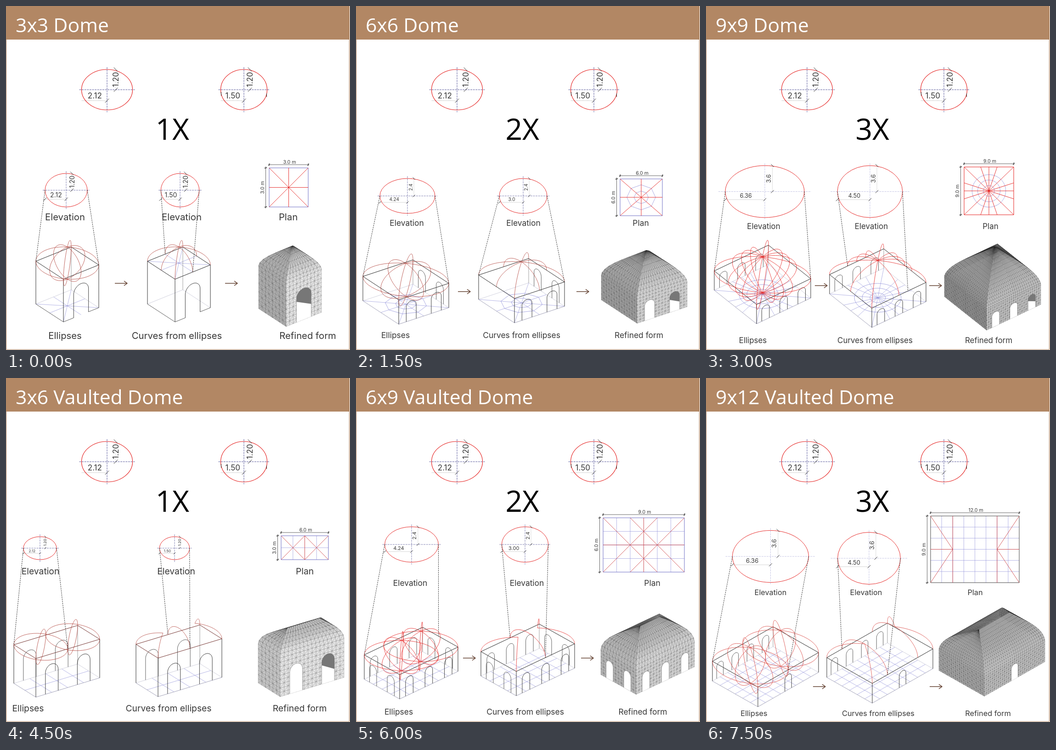
Write an HTML page with a canvas that moves like this. It is 749 px wide and 748 px high and loops after 9 s.

```html
<!DOCTYPE html>
<html lang="en">
<head>
<meta charset="utf-8">
<title>Dome types</title>
<style>
html, body { margin: 0; width: 100%; height: 100%; overflow: hidden; background: #fff; }
canvas { display: block; width: 749px; height: 748px; }
</style>
</head>
<body>
<canvas id="stage"></canvas>
<script>
const W = 749, H = 748, HOLD = 1500, TAU = Math.PI * 2;
const BROWN = '#b28764', RED = '#e5201f', DULL = '#b03f38', BLUE = '#8585d6', INK = '#1c1c1c';
const canvas = document.getElementById('stage');
const dpr = window.devicePixelRatio || 1;
canvas.width = W * dpr;
canvas.height = H * dpr;
const g = canvas.getContext('2d');

// Plan directions run from -1 to 1 on both axes.
const DIAGONALS = [[1, 1], [1, -1]];
const STAR = [...DIAGONALS, [1, 0], [0, 1]];
const THIRDS = [[1, 1/3], [1/3, 1], [-1/3, 1], [1, -1/3]];
const CORNERS = [[1, 1], [1, -1], [-1, 1], [-1, -1]];
const WIDE = [[-1, 1], [1, -1]], MID = [[0, 1], [0, -1]];

// k: scale factor; left, right: base edges from the front corner; fronts: front corner of each building;
// doors: count and width per wall; feet: roof points where the guide lines of each building land.
const scenes = [
  {
    k: 1, arc: DULL, left: [-60, -39], right: [77, -31], h: 93, z: 35, rise: 47, solid: true,
    fronts: [[125, 687], [368, 687], [610, 697]], doors: { FR: [1, 0.42] }, door: 68, dark: true, feet: [WIDE, MID],
    ellipse: [131, 400.5, 46, 36.5], second: [379, 400.5], font: 14, plan: [615.5, 394.5, 85, 85],
    ink: 20.3, rows: [466, 724], xs: [128.5, 382.5, 614.5, 128.5, 372, 657], arrows: [237, 477, 603]
  },
  {
    k: 2, arc: DULL, left: [-78, -51], right: [109, -36], h: 53, z: 36, rise: 62,
    fronts: [[93, 692], [345, 689], [612, 690]], doors: { FR: [2, 0.2], BR: [2, 0.2] }, door: 42, dark: true, feet: [WIDE, WIDE],
    ellipse: [112, 413, 60, 38], second: [364, 413], font: 10, short: '3.0', plan: [621, 416, 92, 80],
    ink: 17.4, rows: [478, 722], xs: [110.5, 364.5, 620, 86, 360.5, 616], arrows: [222, 480, 621]
  },
  {
    k: 3, arc: RED, left: [-92, -73], right: [118, -56], h: 42, z: 39, rise: 75,
    fronts: [[110, 691], [361, 699], [611, 705]], doors: { FR: [3, 0.14], LB: [3, 0.14] }, door: 31, dark: true,
    feet: [WIDE, [[-1/3, 1], [1/3, -1]]],
    ellipse: [128, 403.5, 86, 56.5], second: [357, 403.5], font: 12.5, plan: [616, 402, 108, 104],
    ink: 16.9, rows: [485, 733], xs: [125.5, 360, 619.5, 102, 368, 615.5], arrows: [237, 486, 608]
  },
  {
    k: 1, vault: true, ridge: 1/2, arc: DULL, edge: '#6d2a26', left: [-48, -30], right: [139, -42], h: 84, z: 29, rise: 40,
    fronts: [[65, 694], [331, 693], [597, 693]], doors: { FR: [2, 0.2], LB: [2, 0.2] }, door: 62, dark: true,
    feet: [[[-1, 1], [0, -1]], MID],
    ellipse: [74, 370, 36, 25], second: [367, 370], font: 8, plan: [650.5, 369, 103, 52],
    ink: 19.3, rows: [427, 725], xs: [75, 370.5, 650.5, 48, 354, 639.5]
  },
  {
    k: 2, vault: true, ridge: 1/3, arc: RED, left: [-77, -43], right: [127, -60], h: 53, z: 33, rise: 54,
    fronts: [[95, 698], [349, 691], [610, 688]], doors: { FR: [3, 0.13], FL: [2, 0.2], LB: [3, 0.13], BR: [2, 0.2] }, door: 40,
    feet: [[[-1, 1], [1, 0.1]], MID],
    ellipse: [121, 362, 58.5, 38.5], second: [368, 362], font: 11, plan: [626.5, 363, 177, 118],
    ink: 17.4, rows: [452, 732], xs: [118, 372, 645, 93, 368.5, 624.5], arrows: [233, 490, 609]
  },
  {
    k: 3, vault: true, ridge: 1/2, arc: '#d8413c', left: [-99, -56], right: [132, -75], h: 43, z: 39, rise: 55,
    fronts: [[113, 715], [362, 707], [606, 692]], doors: { FR: [1, 0.11], LB: [4, 0.11] }, door: 33,
    feet: [[[-1, 1], [0, -1]], [[-1/2, 1], [-1/2, -1]]],
    ellipse: [140.5, 388, 83, 56.5], second: [355, 392], font: 13, plan: [585.5, 372.5, 193, 145],
    ink: 16.3, rows: [472, 735], xs: [140.5, 348.5, 586, 104.5, 375, 614], arrows: [233, 487, 671]
  }
];

// Fills in the lines and arcs that follow from the type and the scale.
function layOut(s) {
  const { k, ridge: c = 0 } = s, half = 1 - c;
  s.ridge = c;
  s.depth = 3 * k;
  s.length = s.vault ? s.depth + 3 : s.depth;
  if (!s.vault) {
    const dirs = k < 3 ? STAR : [...STAR, ...THIRDS];
    s.red = s.rays = dirs.map(([a, b]) => [-a, -b, a, b]);
    s.rings = k > 1 ? k : 0;
    s.full = dirs.map(([a, b]) => [0, a, b, 2]);
    s.half = dirs.map(([a, b], i) => [0, a, b, i < 4 ? 1 : 0.5]);
    return;
  }
  s.grid = [2 * k + 2, 2 * k];
  const dirs = k > 1 ? STAR : DIAGONALS;
  s.full = [-c, c].flatMap(m => dirs.map(([a, b]) => [m, a * half, b, 2]));
  const arches = k < 3 ? [0] : [-c, c];
  s.half = [...CORNERS.map(([a, b]) => [a * c, a * half, b, 0.5]), ...arches.map(m => [m, 0, 1, 1])];
  const cross = [-c, c].flatMap(m => [[m - half, -1, m + half, 1], [m - half, 1, m + half, -1]]);
  const hips = [...CORNERS.map(([a, b]) => [a, b, a * c, 0]), [-1, 0, -c, 0], [c, 0, 1, 0]];
  s.red = [...(k < 3 ? cross : hips), ...arches.map(m => [m, -1, m, 1])];
  if (k === 2) s.red.push([-1, 0, 1, 0]);
}
scenes.forEach(layOut);

function trace(pts, close) {
  g.beginPath();
  pts.forEach(p => g.lineTo(p[0], p[1]));
  if (close) g.closePath();
}

function line(pts, color, width = 1, close = false) {
  trace(pts, close);
  g.strokeStyle = color;
  g.lineWidth = width;
  g.stroke();
}

function fill(pts, color) {
  trace(pts, true);
  g.fillStyle = color;
  g.fill();
}

function dashed(pts, color, dash, width) {
  g.setLineDash(dash);
  line(pts, color, width);
  g.setLineDash([]);
}

function text(str, x, y, size, { color = '#383838', font = 'Inter', align = 'center', weight = 400 } = {}) {
  g.font = `${weight} ${size}px "${font}", sans-serif`;
  g.textAlign = align;
  g.fillStyle = color;
  g.fillText(str, x, y);
}

function upright(str, x, y, size) {
  g.save();
  g.translate(x, y);
  g.rotate(-Math.PI / 2);
  text(str, 0, 0, size);
  g.restore();
}

const tick = (x, y, r = 3, dir = 1) => line([[x - r, y + r * dir], [x + r, y - r * dir]], INK, 0.9);
const lerp = (p, q, s) => [p[0] + (q[0] - p[0]) * s, p[1] + (q[1] - p[1]) * s];
const add = (p, q) => [p[0] + q[0], p[1] + q[1]];
const up = (p, z) => [p[0], p[1] - z];
const steps = (n, f) => Array.from({ length: n + 1 }, (_, i) => f(i / n));

function elevation(cx, cy, rx, ry, size, k, width, hx = cx + 8 + rx * 0.1) {
  const far = rx + (k === 3 ? 15 : 5), r = size / 4, y = cy + size * 1.4;
  const axis = k === 3 ? '#b4b4dc' : '#5b5b9c', thick = size > 15 ? 1 : 0.75;
  const tall = k === 1 ? '1.20' : (1.2 * k).toFixed(1);
  line([[cx - rx, y], [cx, y]], '#aaa', 0.5);
  line([[hx, cy - ry], [hx, cy]], '#bbb', 0.5);
  dashed([[cx - far, cy], [cx + far, cy]], axis, [4, 1.6], thick);
  dashed([[cx, cy - ry - 5], [cx, cy + ry + 5]], axis, [4, 1.6], thick);
  g.beginPath();
  g.ellipse(cx, cy, rx, ry, 0, 0, TAU);
  g.strokeStyle = RED;
  g.lineWidth = size > 15 ? 1.15 : 0.95;
  g.stroke();
  tick(hx, cy - ry, r, -1);
  tick(hx, cy, r);
  tick(cx, y, r);
  if (size < 15) tick(cx - rx, y, r);
  text(width, cx - rx * 0.48, y - size * 0.3, size);
  upright(tall, k === 1 ? hx + size * 0.36 : hx - 3.5, cy - ry * 0.5, size);
}

// Ends of both ellipses, for the guide lines.
function elevations({ k, ellipse: [cx, cy, rx, ry], second: [x2, y2], font, short = (1.5 * k).toFixed(2) }) {
  const r2 = rx * (0.95 - 0.042 * k);
  elevation(cx, cy, rx, ry, font, k, (2.12 * k).toFixed(2));
  elevation(x2, y2, r2, ry, font, k, short);
  return [[[cx - rx, cy], [cx + rx, cy]], [[x2 - r2, y2], [x2 + r2, y2]]];
}

function building(s, index) {
  const F = s.fronts[index], L = add(F, s.left), R = add(F, s.right), B = add(L, s.right);
  const C = lerp(L, R, 0.5);
  const at = (a, b, z = 0) => [
    C[0] + (s.right[0] * a + s.left[0] * b) / 2,
    C[1] + (s.right[1] * a + s.left[1] * b) / 2 - z
  ];
  return { F, L, R, B, at };
}

// Blue grid, rings and rays laid on any plane given by a mapping.
function pattern(s, at, rays = []) {
  const seg = ([a, b, c, d]) => line([at(a, b), at(c, d)], BLUE, 0.6);
  const [n, m] = s.grid || [0, 0];
  for (let i = 1; i < n; i++) seg([2 * i / n - 1, -1, 2 * i / n - 1, 1]);
  for (let j = 1; j < m; j++) seg([-1, 2 * j / m - 1, 1, 2 * j / m - 1]);
  for (let i = 1; i <= s.rings; i++) {
    const r = 0.68 * i / s.rings;
    line(steps(s.k === 2 ? 8 : 48, t => at(r * Math.cos(t * TAU), r * Math.sin(t * TAU))), BLUE, 0.7);
  }
  rays.forEach(seg);
}

function plan(s) {
  const [cx, cy, w, h] = s.plan, size = 10.5;
  const at = (a, b) => [cx + a * w / 2, cy + b * h / 2];
  const [x0, y0] = at(-1, -1), [x1, y1] = at(1, 1), x = x0 - 7.5, y = y0 - 7;
  const frame = s.k < 3 ? '#6f6fc4' : s.vault ? '#444' : RED;
  pattern(s, at);
  line([at(-1, -1), at(1, -1), at(1, 1), at(-1, 1)], frame, 1, true);
  s.red.forEach(([a, b, c, d]) => line([at(a, b), at(c, d)], s.vault ? '#d0484a' : RED, 0.9));
  line([[x0 - 2, y], [x1 + 2, y]], '#555', 0.9);
  line([[x, y0 - 3], [x, y1 + 3]], '#555', 0.9);
  [x0, x1].forEach(v => { line([[v, y - 3], [v, y + 3]], INK, 0.8); tick(v, y, 2); });
  [y0, y1].forEach(v => { line([[x - 3, v], [x + 3, v]], INK, 0.8); tick(x, v, 2); });
  text(s.length + '.0 m', cx + 2, y - 2.5, size);
  upright(s.depth + '.0 m', x - 3.5, cy, size);
}

function arch(P, Q, mid, width, h) {
  const r = h * 0.25;
  const curve = steps(16, t => up(
    lerp(P, Q, mid - width / 2 * Math.cos(t * Math.PI)),
    h - r + r * Math.sin(t * Math.PI)
  ));
  return [lerp(P, Q, mid - width / 2), ...curve, lerp(P, Q, mid + width / 2)];
}

// Evenly spaced doors of one wall.
function doorsOf(s, b, face) {
  const [n, width] = s.doors[face] || [0, 0];
  return Array.from({ length: n }, (_, i) => arch(b[face[0]], b[face[1]], (i + 0.5) / n, width, s.door));
}

function wireframe(s, index) {
  const b = building(s, index), { F, L, R, B, at } = b, { h, z } = s;
  const base = s.solid ? '#333' : '#8c8ca8';
  if (s.solid && index) pattern(s, (x, y) => at(x, y, h), s.rays);
  else pattern(s, at, s.rays);
  line([L, B, R], '#b4b4c8', 0.6);
  line([L, F], base, 0.8);
  const gap = s.solid ? s.doors.FR[1] / 2 : 0;
  line([F, lerp(F, R, 0.5 - gap)], base, 0.8);
  line([lerp(F, R, 0.5 + gap), R], base, 0.8);
  line([B, up(B, h)], '#777', 0.7);
  [F, L, R].forEach(p => line([p, up(p, h)], INK, 0.9));
  line([L, F, R, B].map(p => up(p, h)), s.edge || INK, 0.95, true);
  for (const face in s.doors)
    doorsOf(s, b, face).forEach(pts => line(pts, face === 'FR' ? INK : '#444', 0.85));
  for (const [c, da, db, span] of index ? s.half : s.full)
    line(steps(48, t => {
      const w = t * Math.PI * span;
      return at(c + da * Math.cos(w), db * Math.cos(w), h + z * Math.sin(w));
    }), s.arc, 0.8);
}

function facet(pts, tone, flip) {
  const v = Math.round(tone), seam = 'rgba(35,35,35,.55)';
  fill(pts, `rgb(${v},${v},${v})`);
  line(pts, seam, 0.4, true);
  line(flip ? [pts[1], pts[3]] : [pts[0], pts[2]], seam, 0.4);
}

function wall(P, Q, h, cols, rows, tone) {
  for (let i = 0; i < cols; i++)
    for (let j = 0; j < rows; j++) {
      const p = lerp(P, Q, i / cols), q = lerp(P, Q, (i + 1) / cols);
      const lo = h * j / rows, hi = h * (j + 1) / rows;
      facet([up(p, lo), up(q, lo), up(q, hi), up(p, hi)], tone, (i + j) % 2);
    }
}

// Roof as shrinking rings: straight towards the top, rounded at the eaves.
function roof(s, at, cells, tones) {
  const { ridge, rise, h } = s, bulge = s.vault ? 0.45 : 0.28;
  const rim = [[-1, -1], [1, -1], [1, 1], [-1, 1]];
  const rings = Math.max(6, Math.round(cells[1] * 0.6));
  const ring = j => Math.sin(j / rings * Math.PI / 2);
  const height = d => rise * ((1 - bulge) * (1 - d) + bulge * Math.sqrt(1 - d ** 6));
  const point = ([x, y], d) => add(at(x * (ridge + (1 - ridge) * d), y * d, h + height(d)), [5 * (1 - d), 0]);
  const top = 172;
  for (const side of [2, 1, 3, 0]) {
    const P = rim[side], Q = rim[(side + 1) % 4], n = cells[side % 2];
    const run = side % 2 ? Math.hypot(...s.right) * (1 - ridge) / 2 : Math.hypot(...s.left) / 2;
    for (let j = rings - 1; j >= 0; j--) {
      const d0 = ring(j), d1 = ring(j + 1);
      const slope = (height(d0) - height(d1)) / (d1 - d0) / run;
      const steep = slope * slope / (1 + slope * slope);
      const tone = top + (tones[side] - top) * steep;
      for (let i = 0; i < n; i++) {
        const p = lerp(P, Q, i / n), q = lerp(P, Q, (i + 1) / n);
        facet([point(p, d1), point(q, d1), point(q, d0), point(p, d0)], tone, i < n / 2);
      }
    }
  }
}

function refined(s) {
  const b = building(s, 2), { F, L, R, at } = b, { h, k } = s;
  const cell = 11 - 2 * k;
  const count = v => 2 * Math.round(Math.hypot(...v) / cell / 2);
  const cells = [count(s.right), count(s.left)], rows = Math.round(h / cell);
  const right = 242 - 14 * k, left = right - (s.vault ? 30 : 55);
  roof(s, at, cells, [right, 120, 120, left]);
  wall(F, L, h, cells[1], rows, left);
  wall(F, R, h, cells[0], rows, right);
  for (const face of ['FL', 'FR'])
    doorsOf(s, b, face).forEach((pts, i, all) => {
      fill(pts, '#fff');
      if (s.dark && i === all.length - 1) {
        g.save();
        trace(pts, true);
        g.clip();
        const p = pts[0], q = pts[pts.length - 1], z = s.door;
        fill([up(p, z * 0.66), up(q, z * 0.4), up(q, z * 1.2), up(p, z * 1.2)], '#777');
        g.restore();
      }
      line(pts, '#666', 0.6);
    });
}

function arrow(x, y) {
  const end = x + 27;
  line([[x, y], [end, y]], '#5a3524', 1.4);
  line([[end - 7, y - 5], [end, y], [end - 7, y + 5]], '#5a3524', 1.4);
}

function shell(s) {
  const sides = `${s.depth}x${s.length}`;
  g.fillStyle = '#fff';
  g.fillRect(0, 0, W, H);
  g.fillStyle = BROWN;
  g.fillRect(0, 0, 748, 73);
  line([[0.5, 0], [0.5, 747], [747.5, 747], [747.5, 0]], BROWN, 1.2);
  text(`${sides} ${s.vault ? 'Vaulted ' : ''}Dome`, 21, 57, 42.7, { color: '#fff', font: 'Open Sans', align: 'left' });
  text(s.k + 'X', 399, 291, 64, { color: '#000', font: 'Open Sans', align: 'right', weight: 500 });
  elevation(220, 182, 55.5, 44, 17, 1, '2.12', 239);
  elevation(518, 182, 50.5, 44, 17, 1, '1.50', 531);
  line([[468.5, 187], [468.5, 195]], INK, 0.9);
  line([[567.5, 190], [567.5, 198]], INK, 0.9);
}

function draw(s) {
  g.setTransform(dpr, 0, 0, dpr, 0, 0);
  g.lineJoin = 'round';
  shell(s);
  const ends = elevations(s);
  plan(s);
  [0, 1].forEach(index => {
    wireframe(s, index);
    const { at } = building(s, index);
    s.feet[index].forEach(([a, b], i) => dashed([ends[index][i], at(a, b, s.h)], INK, [3, 1.6], 0.85));
  });
  refined(s);
  ['Elevation', 'Elevation', 'Plan', 'Ellipses', 'Curves from ellipses', 'Refined form']
    .forEach((label, i) => text(label, s.xs[i], s.rows[i < 3 ? 0 : 1], s.ink));
  if (s.arrows) {
    const [x0, x1, y] = s.arrows;
    arrow(x0, y);
    arrow(x1, y);
  }
}

const start = performance.now();
let shown = -1;
function play() {
  const now = Math.max(0, performance.now() - start);
  const index = Math.floor(now / HOLD) % scenes.length;
  if (index !== shown) draw(scenes[shown = index]);
  requestAnimationFrame(play);
}
play();
</script>
</body>
</html>
```
